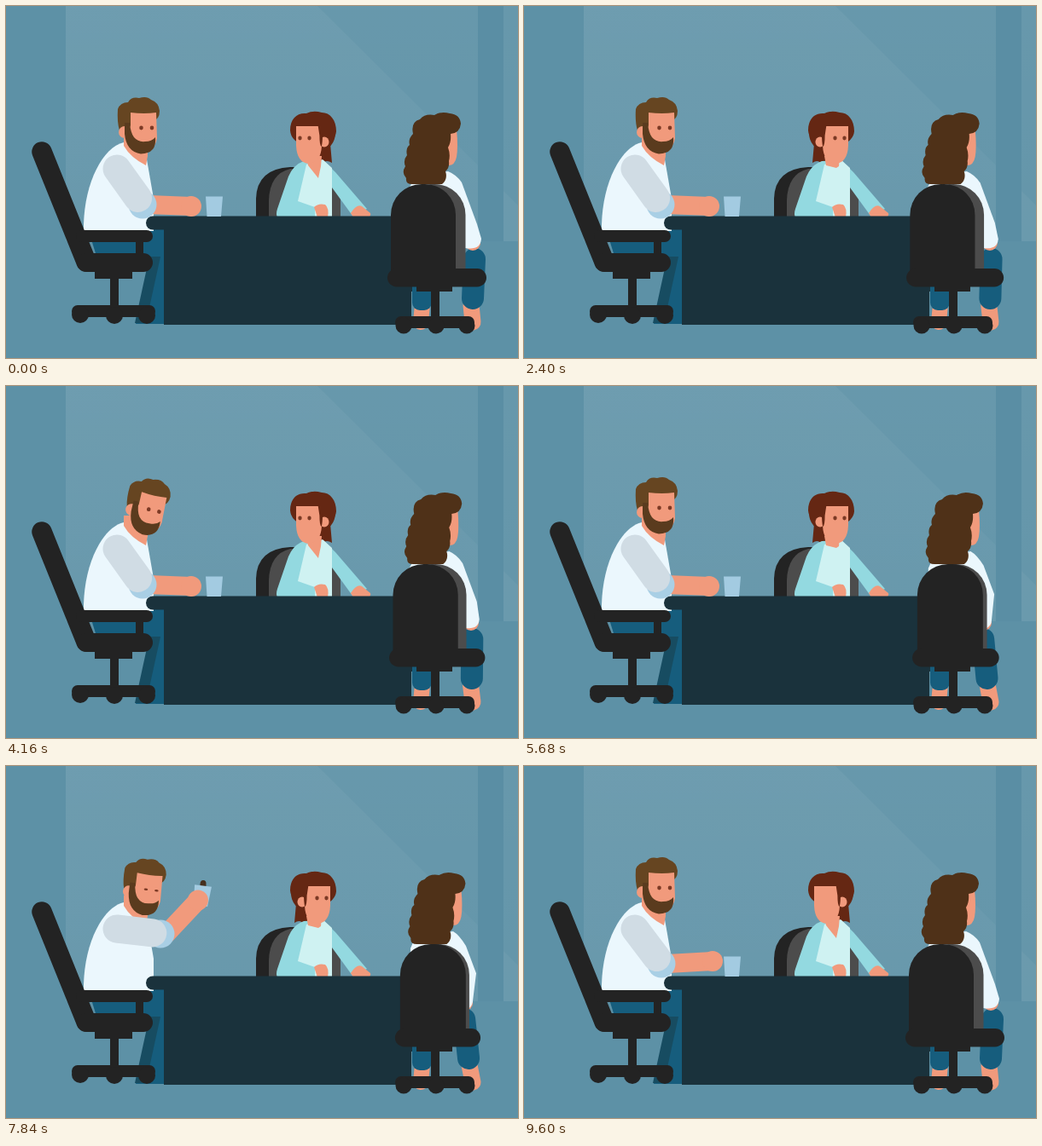
Recreate the animation shown at these times as an HTML page. Size 600 by 413 pixels, loop 9640 ms.

```html
<!DOCTYPE html>
<html lang="en">
<head>
<meta charset="utf-8">
<title>Meeting</title>
<style>
html, body { margin: 0; width: 100%; height: 100%; overflow: hidden; background: #5d91a6; }
svg { display: block; width: 100vw; height: 100vh; }
.dark { fill: #232323; }
.darkline { stroke: #232323; }
.grey { fill: #4c4c4c; }
.skin { fill: #f19a7c; }
.skinline { stroke: #f19a7c; }
.shirt { fill: #ebf7fd; }
.jeans { fill: #165d7d; }
.table { fill: #1a323c; }
.teal { fill: #93d9e0; }
.red { fill: #652713; }
.brown { fill: #4f3118; }
.eye { fill: #7c3a25; }
.line { fill: none; stroke-linecap: round; stroke-linejoin: round; }
</style>
</head>
<body>
<svg viewBox="0 0 600 413" preserveAspectRatio="none">
  <defs>
    <linearGradient id="glass" x1="0" y1="0" x2="0" y2="1">
      <stop offset="0" stop-color="#fff" stop-opacity=".065"/>
      <stop offset="1" stop-color="#fff" stop-opacity=".045"/>
    </linearGradient>
    <linearGradient id="shine" x1="0" y1="0" x2="0" y2="1">
      <stop offset="0" stop-color="#fff" stop-opacity=".045"/>
      <stop offset="1" stop-color="#fff" stop-opacity=".025"/>
    </linearGradient>
  </defs>

  <!-- room -->
  <rect width="600" height="413" fill="#5d91a6"/>
  <rect x="70" width="483" height="276" fill="url(#glass)"/>
  <path d="M70 0H365L553 187V276H70Z" fill="url(#shine)"/>
  <rect x="553" width="30" height="276" fill="#1b4a62" opacity=".04"/>
  <rect x="583" width="17" height="276" fill="url(#glass)"/>
  <path d="M583 217L600 234V276H583Z" fill="#fff" opacity=".04"/>

  <!-- man: body and chair -->
  <g id="man">
    <path class="jeans" d="M100 274H150V262H186V373H152L170 300H108Z"/>
    <path d="M168 294H181L164 372H151Z" fill="#174c61"/>
    <path class="shirt" d="M138 160C112 166 90 212 91 264H173V226L165 180Z"/>
    <path class="skin" d="M138 152H166V176L164 187Q146 178 138 164Z"/>
    <path class="line darkline" d="M42 171L94 300" stroke-width="23.500"/>
    <rect class="dark" x="83" y="290" width="89" height="22" rx="11"/>
    <rect class="dark" x="82" y="263" width="90" height="14" rx="7"/>
    <rect class="dark" x="152" y="270" width="9" height="26"/>
    <rect class="dark" x="104" y="308" width="44" height="12"/>
    <rect class="dark" x="122" y="318" width="10" height="36"/>
    <rect class="dark" x="77" y="351" width="98" height="14" rx="7"/>
    <circle class="dark" cx="87" cy="362" r="10"/>
    <circle class="dark" cx="127" cy="363" r="10"/>
    <circle class="dark" cx="165" cy="363" r="10"/>
  </g>

  <!-- woman behind the table -->
  <path class="dark" d="M293 248V226Q294 191 333 189H350V248Z"/>
  <path class="grey" d="M308 248V228Q309 197 333 191H360Q392 195 392 228V248Z"/>
  <path id="tail" class="red" d="M346 150H374L377 184Q369 179 366 186H354Q350 179 343 184Z"/>
  <path class="teal" d="M349 182Q337 186 331 200L318 238Q316 244 318 248H382V213L406 246L423 238L386 195L372 181Z"/>
  <path d="M352 186L342 229L362 236V248H382V190L371 180Z" fill="#cff2f2"/>
  <path id="neck" class="skin"/>
  <path class="skin" d="M361 236Q366 231 374 233Q379 237 377 248H365Z"/>
  <path class="skin" d="M404 243Q411 232 417 235L427 243Q428 247 424 248H407Z"/>
  <ellipse id="backHair" class="red" cy="149" rx="17" ry="20"/>
  <path class="red" d="M333 146C333 132 341 125 352 126Q360 122 370 125C380 125 387 134 387 147Q386 158 372 163H348Q334 158 333 146Z"/>
  <ellipse id="earL" class="skin" cy="159.500" ry="6"/>
  <ellipse id="earR" class="skin" cy="159.500" ry="6"/>
  <g id="face">
    <path class="skin" d="M345 141H375V164Q374 184 360 185Q346 184 345 164Z"/>
    <path id="lockL" class="red" d="M0 140H9L6 152Q6 164 2 165Q0 160 0 150Z"/>
    <path id="lockR" class="red" d="M0 140H9L6 152Q6 164 2 165Q0 160 0 150Z"/>
  </g>
  <ellipse id="herEyeL" class="eye" cy="155" rx="2.2"/>
  <ellipse id="herEyeR" class="eye" cy="155" rx="2.2"/>

  <!-- table -->
  <rect class="table" x="164" y="246.500" width="316" height="16" rx="8"/>
  <rect class="table" x="185" y="255" width="290" height="119"/>
  <rect class="table" x="470" y="255" width="9" height="80"/>

  <!-- man: head, cup, arm -->
  <g id="top">
    <g id="head">
      <path d="M133 146Q130 136 131 121Q134 113 143 113Q147 106 156 108Q165 105 170 110Q179 113 180 123Q180 133 172 135L146 146Z" fill="#664521"/>
      <ellipse class="skin" cx="139" cy="148" rx="7" ry="7"/>
      <path class="skin" d="M146 125Q162 127 176 125L177 155Q174 172 158 172Q145 170 141 152L146 140Z"/>
      <path d="M139 137H145Q146 149 150 154Q155 160 163 159Q171 159 175 154Q177 173 158 173.500Q141 171 139 150Z" fill="#5a3b1e"/>
      <ellipse id="hisEyeL" class="eye" cx="158.500" cy="143" rx="2.300"/>
      <ellipse id="hisEyeR" class="eye" cx="171" cy="143" rx="2.300"/>
    </g>
    <path id="splash" d="M-3.500 4V0Q-3 -4 0 -4Q4 -4 3.500 1V4Z" fill="#46301f"/>
    <path id="cup" d="M-10 -12.500H10L8 11H-8.500Z" fill="#a3cbe1"/>
    <path id="forearm" class="line skinline" stroke-width="22"/>
    <circle id="hand" class="skin" r="12"/>
    <circle id="cuff" r="16.500" fill="#a9cfe5"/>
    <path id="sleeve" class="line" stroke="#d0dce4" stroke-width="33"/>
  </g>

  <!-- woman in the swivel chair -->
  <path class="line skinline" d="M488 350L486 371" stroke-width="18"/>
  <path id="foot" class="line skinline" stroke-width="19"/>
  <rect class="jeans" x="476" y="315" width="23" height="42" rx="9"/>
  <path id="leg" class="line" stroke="#165d7d" stroke-width="26"/>
  <circle id="elbow" class="skin" r="9"/>
  <path id="back" class="shirt"/>
  <g id="her">
    <path class="skin" d="M508 145H528Q530 165 528 177Q526 188 517 187L508 185Z"/>
    <path class="brown" d="M477 150Q474 136 485 133Q491 126 502 128Q510 123 520 126Q532 127 533 138Q532 149 521 150Q522 160 518 166Q521 174 519 182Q520 190 515 194Q518 203 511 209H476Q468 209 469 202Q463 196 468 188Q465 181 470 175Q468 167 473 163Q471 156 477 150Z"/>
  </g>
  <path id="side" class="grey"/>
  <path id="rest" class="dark"/>
  <rect id="seat" class="dark" y="308" height="21.500" rx="10.700"/>
  <rect class="dark" x="481" y="326" width="42" height="9"/>
  <rect class="dark" x="498" y="330" width="10" height="38"/>
  <rect class="dark" x="456" y="364" width="93" height="14" rx="7"/>
  <circle class="dark" cx="466" cy="375" r="9.500"/>
  <circle class="dark" cx="504" cy="375" r="9.500"/>
  <circle class="dark" cx="540" cy="375" r="9.500"/>
</svg>
<script>
const LOOP = 9640, HALF = LOOP / 2;
const el = {};
document.querySelectorAll('svg [id]').forEach(n => el[n.id] = n);

const set = (id, attrs) => { for (const k in attrs) el[id].setAttribute(k, attrs[k]); };
const move = (id, x, y = 0, r = 0, sx = 1) =>
  set(id, { transform: `translate(${x} ${y}) rotate(${r}) scale(${sx} 1)` });
const mix = (a, b, k) => a + (b - a) * k;
const clamp = v => Math.max(0, Math.min(1, v));
const ease = k => (1 - Math.cos(Math.PI * clamp(k))) / 2;

// keys: [time, pose] pairs, each pose an array of numbers
function pose(t, keys) {
  let i = 0;
  while (i < keys.length - 2 && t >= keys[i + 1][0]) i++;
  const [t0, a] = keys[i], [t1, b] = keys[i + 1];
  const k = ease((t - t0) / (t1 - t0));
  return a.map((v, n) => mix(v, b[n], k));
}

const blink = (t, times, gap, fade) =>
  Math.min(...times.map(c => clamp((Math.abs(t - c) - gap) / fade)));

// arm: elbow x, y, hand x, y
const rest = [160, 233, 217, 235], fist = [180, 205, 198.5, 157], high = [184, 192, 201, 117];
const grab = [161, 232, 221, 229], lift = [181, 197, 225, 157.5], sip = [181, 197, 201, 163];
const arm = [[0, rest], [2400, rest], [2800, fist], [3200, fist], [3320, high], [3460, rest],
  [6960, rest], [7150, grab], [7600, lift], [7960, lift], [8250, sip], [8650, sip],
  [8960, lift], [9440, grab], [9600, grab], [LOOP, rest]];

// head: x, y, tilt
const calm = [0, 0, 0], shift = [2.5, 0, 0], nod = [2.4, -1, 13], look = [2, 0.5, 7], lean = [-1, 0, -5];
const head = [[0, calm], [2400, calm], [2800, shift], [3200, shift], [3320, [0, -5, -3]],
  [3480, nod], [4250, nod], [4700, calm], [7150, calm], [7600, look], [7960, look],
  [8250, lean], [8650, lean], [8960, look], [9440, calm], [LOOP, calm]];

// cup: x, y, tilt
const down = [244, 236, 0], held = [229.5, 153, 7], tipped = [192, 157, -50];
const cup = [[0, down], [7150, down], [7600, held], [7960, held], [8250, tipped],
  [8650, tipped], [8960, held], [9440, down], [LOOP, down]];

const swivel = [[0, [0]], [1080, [1]], [2200, [0]], [3080, [1]], [4660, [0]], [HALF, [0]]];
const turn = [[0, [-1]], [400, [-1]], [800, [1]], [3030, [1]], [3290, [-1]], [HALF, [-1]]];

function drawMan(t) {
  const d = t - 3440;
  const jolt = d > 0 && d < 400 ? 2.5 * Math.abs(Math.sin(d / 60)) * (1 - d / 400) : 0;
  move('man', jolt);
  move('top', jolt);

  const [hx, hy, tilt] = pose(t, head);
  set('head', { transform: `translate(${hx} ${hy}) rotate(${tilt} 150 172)` });
  const open = 2.4 * blink(t, [560, 3170, 5380, 7890], 0, 100);
  set('hisEyeL', { ry: open });
  set('hisEyeR', { ry: open });

  const [ex, ey, x, y] = pose(t, arm);
  set('forearm', { d: `M${ex + 7} ${ey}L${x} ${y}` });
  set('hand', { cx: x, cy: y });
  set('cuff', { cx: ex, cy: ey });
  set('sleeve', { d: `M130 191L${mix(130, ex, 0.82)} ${mix(191, ey, 0.82)}` });

  const [cx, cy, cr] = pose(t, cup);
  move('cup', cx, cy, cr);
  const k = clamp((t - 7740) / 220);
  move('splash', cx + 1.5, cy - 1 - 14 * Math.sin(Math.PI * k));
  el.splash.style.display = k > 0 && k < 1 ? '' : 'none';
}

function drawTeal(t) {
  const s = pose(t % HALF, turn)[0];
  const right = Math.max(0, s), left = Math.max(0, -s);
  move('tail', -5 * s);
  set('neck', { d: `M352 176H370L369 188L366 ${196 - 6 * s}L354 187Z` });
  set('backHair', { cx: 360 - 9 * s });
  move('face', 5 * s);
  move('lockL', 344, 0, 0, 0.6 * clamp(1 + s));
  move('lockR', 376, 0, 0, -0.6 * clamp(1 - s));
  set('earL', { cx: 343 + 4 * right, rx: 5.5 * clamp(0.3 + s) });
  set('earR', { cx: 377 - 4 * left, rx: 5.5 * clamp(0.3 - s) });
  const open = 2.4 * blink(t, [6400, 9590], 15, 35);
  set('herEyeL', { cx: 354.5 + 10 * s, ry: open });
  set('herEyeR', { cx: 365.5 + 10 * s, ry: open });
}

const arch = (l, r) =>
  `M${l} 318V245A36 36 0 0 1 ${l + 36} 209H${r - 36}A36 36 0 0 1 ${r} 245V318Z`;

function drawSwivel(t) {
  const p = pose(t % HALF, swivel)[0];
  move('her', 5.5 * p);
  set('back', { d: `M480 200L${472 + 2 * p} 214V270L${538 + 5 * p} 284` +
    `Q${556 - 9 * p} ${287 - 7 * p} ${557 - 10 * p} ${273 + 2 * p}` +
    `L${552 - p} ${256 - 13 * p}L${534 + 5 * p} ${207 + 4 * p}Q${528 + 3 * p} 198 ${518 + 6 * p} 194Z` });
  set('elbow', { cx: 547 - 9 * p, cy: 278 });
  set('leg', { d: `M${549 - 12 * p} 297L${547 - 5 * p} 343` });
  set('foot', { d: `M${545 - 2 * p} 351L547 371` });
  set('side', { d: arch(462 + 4 * p, 538.5 + 4.5 * p) });
  set('rest', { d: arch(451 + 11 * p, 527 + 12 * p) });
  set('seat', { x: 447 + 9 * p, width: 116 - 16 * p });
}

function draw(now) {
  const t = now % LOOP;
  drawMan(t);
  drawTeal(t);
  drawSwivel(t);
}

const start = performance.now();
function tick() {
  draw(performance.now() - start);
  requestAnimationFrame(tick);
}
tick();
</script>
</body>
</html>
```
